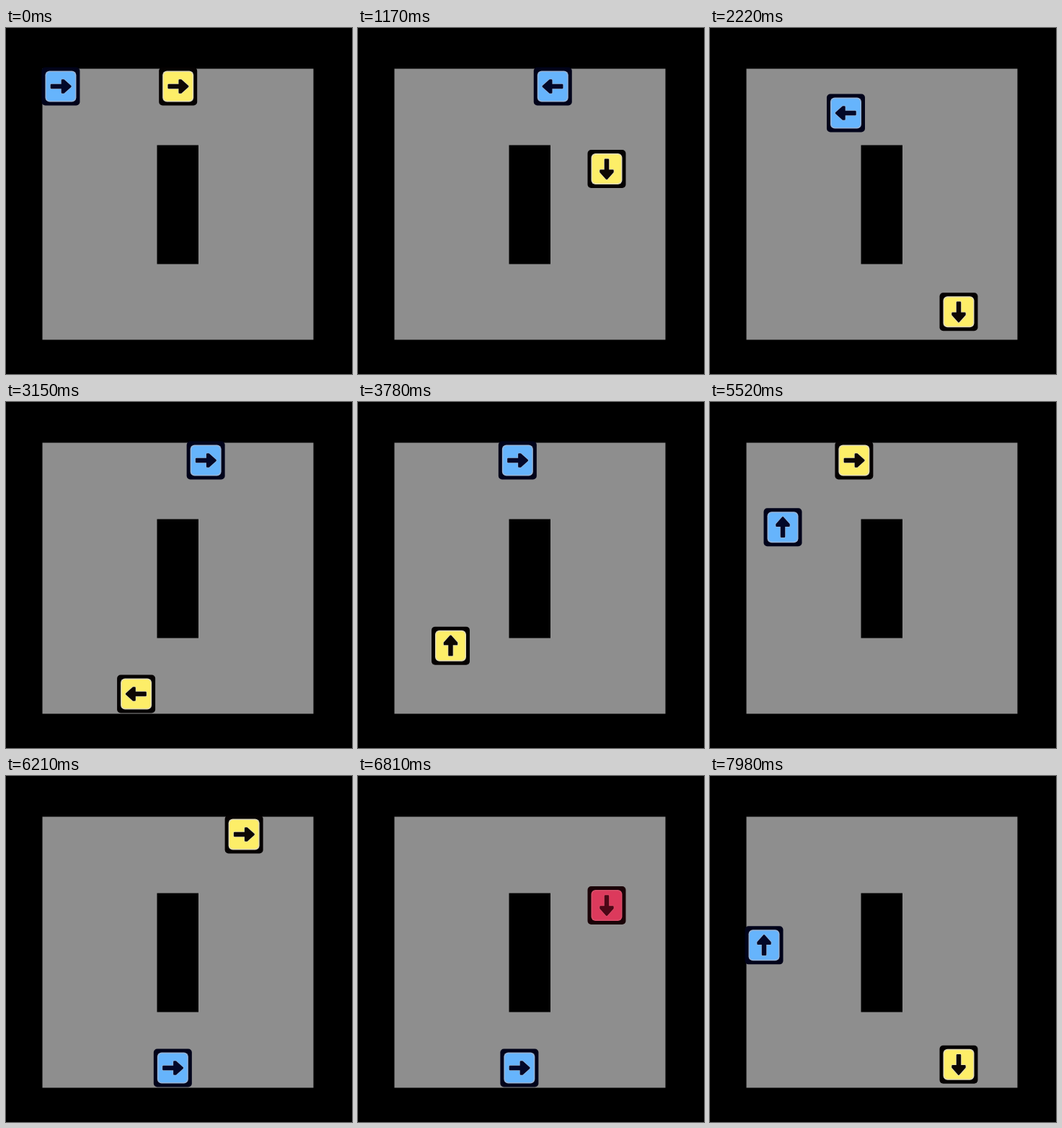
An HTML page with a canvas for the animation above (8 s loop, 480 by 480 pixels).

```html
<!DOCTYPE html>
<html>
<head>
<meta charset="utf-8">
<style>
html, body { margin: 0; height: 100%; overflow: hidden; background: #000; }
canvas { display: block; }
</style>
</head>
<body>
<canvas id="stage" width="480" height="480"></canvas>
<script>
const ctx = document.getElementById('stage').getContext('2d');
const LOOP = 8000;
const RUN_SPEED = 0.94, GUARD_SPEED = 0.1888; // px per ms

const skins = {
  blue:   { fill: '#66b4fc', rim: '#98b4d6', ink: '#020829', border: '#01031a' },
  yellow: { fill: '#fdee68', rim: '#e2dcb8', ink: '#0e0803', border: '#050202' },
  red:    { fill: '#dc3a5c', rim: '#d8506a', ink: '#4c0716', border: '#1a0207' }
};

// A letter runs that way until the wall, or until the given coordinate.
// "@" waits until the given time.
const ORDERS = 'R150 D R U L @1613 R D118 L U @2470 R L201 @3070 R L R D351 L D ' +
  '@4810 R241 L101 @5275 U L @5700 D R L175 @6759 R225 L U D @7800 U';

const directions = {
  R: { axis: 'x', wall: 399, angle: 0 },
  D: { axis: 'y', wall: 405, angle: Math.PI / 2 },
  L: { axis: 'x', wall: 75, angle: Math.PI },
  U: { axis: 'y', wall: 81, angle: -Math.PI / 2 }
};

function runnerAt(t) {
  const pose = { x: 75, y: 81, angle: 0 };
  let clock = 0;
  for (const order of ORDERS.split(' ')) {
    const value = Number(order.slice(1));
    if (order[0] === '@') {
      clock = value;
    } else {
      const { axis, wall, angle } = directions[order[0]];
      const way = (value || wall) - pose[axis];
      const run = Math.min(Math.abs(way), (t - clock) * RUN_SPEED);
      pose[axis] += Math.sign(way) * run;
      pose.angle = angle;
      clock += Math.abs(way) / RUN_SPEED;
    }
    if (clock >= t) break;
  }
  return pose;
}

// The guard circles the block clockwise at constant speed.
function guardAt(t) {
  const left = 128.5, top = 81, width = 216.5, height = 324;
  let s = (110 + GUARD_SPEED * t) % (2 * (width + height));
  if (s < width) return { x: left + s, y: top, angle: 0 };
  s -= width;
  if (s < height) return { x: left + width, y: top + s, angle: Math.PI / 2 };
  s -= height;
  if (s < width) return { x: left + width - s, y: top + height, angle: Math.PI };
  return { x: left, y: top + height - (s - width), angle: -Math.PI / 2 };
}

function square(size, radius, color) {
  ctx.fillStyle = color;
  ctx.beginPath();
  ctx.roundRect(-size / 2, -size / 2, size, size, radius);
  ctx.fill();
}

function strokeArrow(color, width) {
  ctx.strokeStyle = color;
  ctx.lineWidth = width;
  ctx.stroke();
}

function drawTile({ x, y, angle }, skin) {
  ctx.save();
  ctx.translate(x, y);
  square(53, 5, skin.border);
  square(43, 6, skin.rim);
  square(40, 5, skin.fill);
  ctx.rotate(angle);
  ctx.lineJoin = 'round';
  ctx.beginPath();
  ctx.moveTo(-13, -2);
  ctx.lineTo(2, -2);
  ctx.lineTo(2, -8.5);
  ctx.lineTo(4, -8.5);
  ctx.lineTo(13.5, 0);
  ctx.lineTo(4, 8.5);
  ctx.lineTo(2, 8.5);
  ctx.lineTo(2, 2);
  ctx.lineTo(-13, 2);
  ctx.closePath();
  strokeArrow(skin.rim, 4);
  strokeArrow(skin.ink, 2.4);
  ctx.fillStyle = skin.ink;
  ctx.fill();
  ctx.restore();
}

function draw(t) {
  ctx.fillStyle = '#000';
  ctx.fillRect(0, 0, 480, 480);
  ctx.fillStyle = '#8e8e8e';
  ctx.fillRect(50.5, 56.5, 376, 376);
  ctx.fillStyle = '#000';
  ctx.fillRect(209.5, 162.5, 57.5, 165);
  const alert = t >= 6500 && t < 7100;
  drawTile(guardAt(t), alert ? skins.red : skins.yellow);
  drawTile(runnerAt(t), skins.blue);
}

const start = performance.now();
function frame() {
  draw((performance.now() - start) % LOOP);
  requestAnimationFrame(frame);
}
frame();
</script>
</body>
</html>
```
